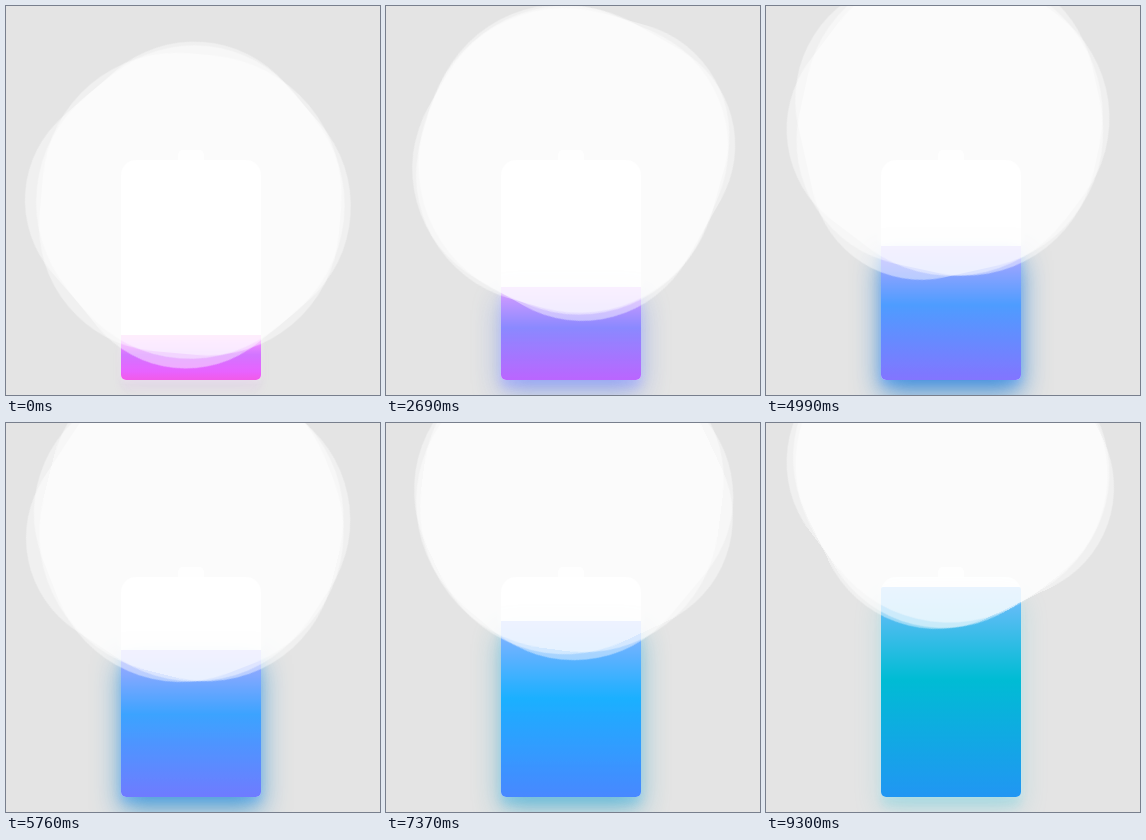
An HTML page that plays this animation: 374 px wide and 389 px high, repeating every 9380 ms.

```html
<!DOCTYPE html>
<html lang="en">
<head>
<meta charset="utf-8">
<title>Charging battery</title>
<style>
  html, body {
    margin: 0;
    width: 100%;
    height: 100%;
    overflow: hidden;
    background: #e4e4e4;
  }
  .stage {
    position: absolute;
    left: 0;
    top: 0;
    width: 374px;
    height: 389px;
    overflow: hidden;
  }
  .container {
    position: absolute;
    left: 115px;
    top: 154px;
    width: 140px;
    height: 220px;
  }
  .cap {
    position: absolute;
    left: 57px;
    top: -10px;
    width: 26px;
    height: 10px;
    border-radius: 5px 5px 0 0;
    background: rgba(255, 255, 255, .88);
  }
  .battery {
    position: relative;
    height: 220px;
    border-radius: 15px 15px 5px 5px;
    background: #fff;
    box-shadow: 0 0 5px 2px rgba(255, 255, 255, .22);
  }
  /* Animations stay paused; the negative delay selects the moment shown. */
  .fill, .wave {
    animation: charge 10s linear infinite paused;
    animation-delay: calc(var(--time, 70) * -1ms);
  }
  .fill {
    position: absolute;
    left: 0;
    right: 0;
    bottom: 0;
    top: 80%;
    border-radius: 0 0 5px 5px;
    background: linear-gradient(to bottom, #7abcff 0%, #00bcd4 44%, #2196f3 100%);
    box-shadow: 0 14px 28px rgba(33, 150, 243, 0), 0 10px 10px rgba(9, 188, 215, .08);
    filter: hue-rotate(90deg);
  }
  .wave {
    position: absolute;
    left: 50%;
    bottom: 25px;
    width: 300px;
    height: 300px;
    border-radius: 45% 47% 44% 42%;
    background: rgba(255, 255, 255, .45);
    transform: translate(-50%, 0) rotate(0deg);
    animation-name: rise;
  }
  .wave.second {
    border-radius: 38% 46% 43% 47%;
    transform: translate(-50%, 0) rotate(-135deg);
  }
  .wave.third {
    border-radius: 42% 46% 37% 40%;
    transform: translate(-50%, 0) rotate(135deg);
  }
  @keyframes charge {
    50% {
      box-shadow: 0 14px 28px rgba(0, 150, 136, .83), 0 4px 10px rgba(9, 188, 215, .4);
    }
    95% {
      top: 5%;
      filter: hue-rotate(0deg);
      border-radius: 0 0 5px 5px;
      box-shadow: 0 14px 28px rgba(4, 188, 213, .2), 0 10px 10px rgba(9, 188, 215, .08);
    }
    100% {
      top: 0%;
      filter: hue-rotate(0deg);
      border-radius: 15px 15px 5px 5px;
      box-shadow: 0 14px 28px rgba(4, 188, 213, 0), 0 10px 10px rgba(9, 188, 215, .4);
    }
  }
  @keyframes rise {
    100% { transform: translate(-50%, -160px) rotate(720deg); }
  }
</style>
</head>
<body>
<div class="stage">
  <div class="container">
    <div class="cap"></div>
    <div class="battery"><div class="fill"></div></div>
    <div class="wave"></div>
    <div class="wave second"></div>
    <div class="wave third"></div>
  </div>
</div>
<script>
  const LOOP = 9380;
  const STEP = 1000 / 13;
  const LAST_STEP = 121;
  const LEAD_IN = 70;
  const SPEED = 1.02;
  const root = document.documentElement;
  const start = performance.now();

  function show() {
    const elapsed = (performance.now() - start) % LOOP;
    const step = Math.min(LAST_STEP, Math.floor((elapsed + 15) / STEP));
    root.style.setProperty('--time', (LEAD_IN + step * STEP * SPEED).toFixed(2));
    requestAnimationFrame(show);
  }
  show();
</script>
</body>
</html>
```
